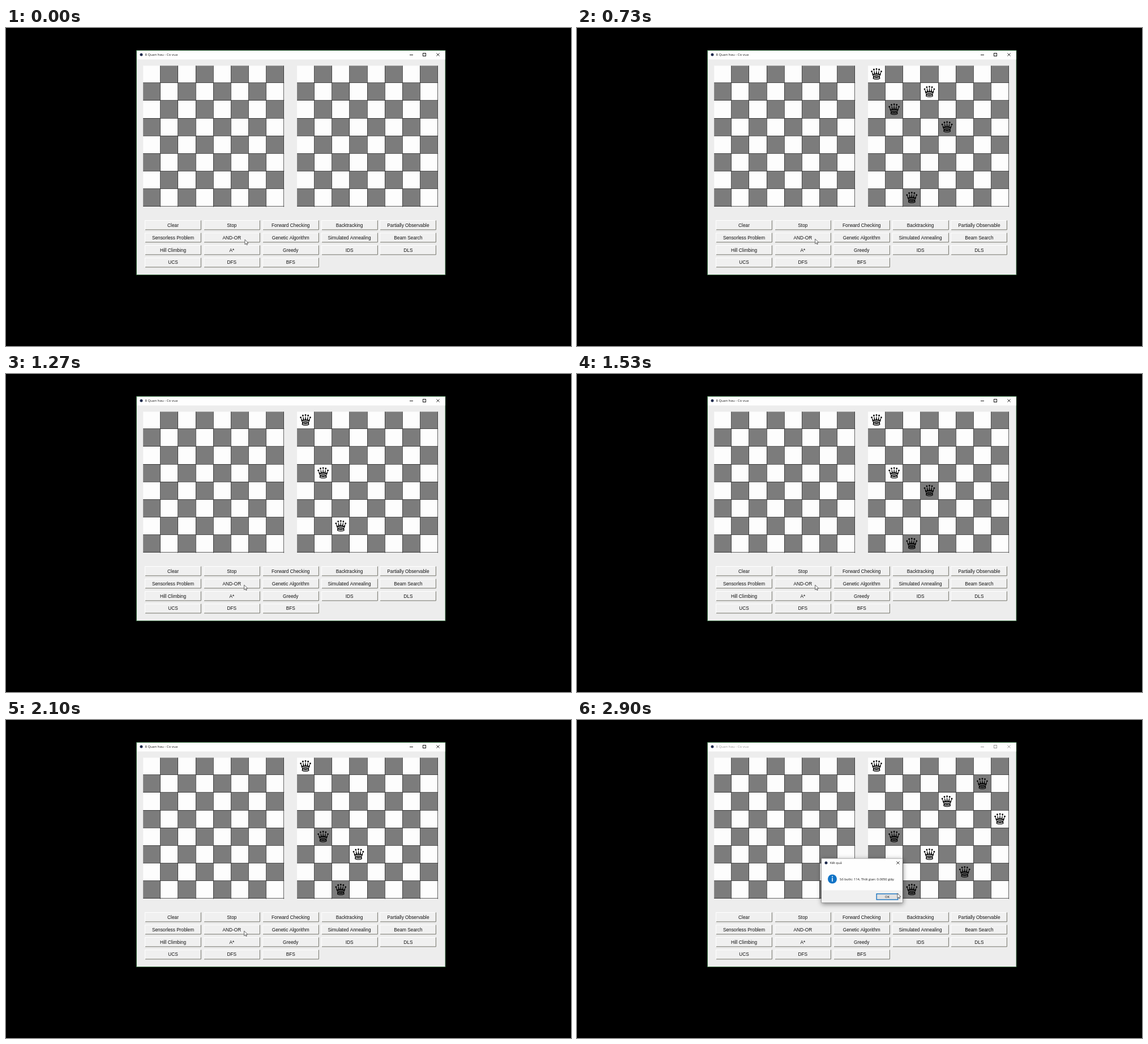
Animation of 998 by 561 pixels, one loop 2930 ms. Source, as an HTML page with a canvas:

```html
<!DOCTYPE html>
<html lang="vi">
<head>
<meta charset="utf-8">
<title>8 Quan hau</title>
<style>
  html, body { margin: 0; width: 100%; height: 100%; overflow: hidden; background: #000; }
  canvas { display: block; }
</style>
</head>
<body>
<canvas id="stage" width="998" height="561"></canvas>
<script>
const stage = document.getElementById('stage');
const screen2d = stage.getContext('2d');
let ctx = screen2d;

const LOOP = 2930, FRAME = 100 / 3;
const STEP = 17.78, LEAD = 8.19;
const CELL = 31.15, LEFT_X = 241.6, RIGHT_X = 513.45, BOARD_Y = 65.6;
const UI = '"Open Sans", "Noto Sans", sans-serif';
const WHITE = '#fdfdfd', GRAY = '#7c7c7c', FACE = '#ededed';
const DIALOG_AT = 2200;

const LABELS = [
  ['Clear', 'Stop', 'Forward Checking', 'Backtracking', 'Partially Observable'],
  ['Sensorless Problem', 'AND-OR', 'Genetic Algorithm', 'Simulated Annealing', 'Beam Search'],
  ['Hill Climbing', 'A*', 'Greedy', 'IDS', 'DLS'],
  ['UCS', 'DFS', 'BFS']
];

const clamp = v => Math.max(0, Math.min(1, v));
const easeOut = (p, n) => 1 - Math.pow(1 - clamp(p), n);

// Every state visited by the depth-first search, column by column
function searchSteps(size) {
  const steps = [[]];
  const safe = (rows, row) => rows.every((r, c) =>
    r !== row && Math.abs(r - row) !== rows.length - c);
  const visit = rows => {
    if (rows.length === size) return true;
    for (let row = 0; row < size; row++) {
      if (!safe(rows, row)) continue;
      const next = [...rows, row];
      steps.push(next);
      if (visit(next)) return true;
    }
    return false;
  };
  visit([]);
  return steps;
}
const steps = searchSteps(8);

function rect(x, y, w, h, color) {
  ctx.fillStyle = color;
  ctx.fillRect(x, y, w, h);
}

function line(color, width, ...pts) {
  ctx.strokeStyle = color;
  ctx.lineWidth = width;
  ctx.beginPath();
  for (let i = 0; i < pts.length; i += 2) ctx.lineTo(pts[i], pts[i + 1]);
  ctx.stroke();
}

function disc(x, y, r, color) {
  ctx.fillStyle = color;
  ctx.beginPath();
  ctx.arc(x, y, r, 0, Math.PI * 2);
  ctx.fill();
}

function text(str, x, y, font, color, align = 'left') {
  ctx.font = font;
  ctx.fillStyle = color;
  ctx.textAlign = align;
  ctx.fillText(str, x, y);
}

function cross(x, y, r, color) {
  line(color, 0.9, x - r, y - r, x + r, y + r);
  line(color, 0.9, x + r, y - r, x - r, y + r);
}

function drawWindow(active) {
  const ink = active ? '#1a1a1a' : '#999';
  rect(230, 39, 546.4, 397, '#3a7445');
  rect(231, 40, 544.6, 395, FACE);
  rect(231, 40, 544.6, 15.5, '#fefefe');
  disc(239, 47, 2.5, '#1d2a4d');
  text('8 Quan hau - Co vua', 245.5, 49.3, '6.1px ' + UI, ink);
  line(ink, 1, 713, 47.5, 719, 47.5);
  ctx.strokeRect(736.5, 44.5, 5, 5);
  cross(763, 47, 2.6, ink);
}

function drawBoard(x0) {
  const end = 8 * CELL, ink = 'rgba(20,20,20,.72)';
  ctx.save();
  ctx.beginPath();
  ctx.rect(x0 + 0.6, BOARD_Y + 0.9, end, end);
  ctx.clip();
  for (let r = 0; r < 8; r++) {
    for (let c = 0; c < 8; c++) {
      rect(x0 + c * CELL, BOARD_Y + r * CELL, CELL + 0.1, CELL + 0.1, (r + c) % 2 ? GRAY : WHITE);
    }
  }
  for (let i = 1; i <= 8; i++) {
    const x = Math.floor(x0 + i * CELL) + 0.5;
    const y = Math.floor(BOARD_Y + i * CELL) + 0.5;
    line(ink, 0.9, x, BOARD_Y, x, BOARD_Y + end + 1);
    line(ink, 0.9, x0, y, x0 + end + 1, y);
  }
  ctx.restore();
}

function drawQueen(col, row) {
  const back = (col + row) % 2 ? GRAY : WHITE;
  ctx.save();
  ctx.translate(RIGHT_X + (col + 0.5) * CELL, BOARD_Y + (row + 0.5) * CELL - 0.2);
  const tips = [[-8.4, -4.3], [-4.6, -7.8], [0, -8.6], [4.6, -7.8], [8.4, -4.3]];
  tips.forEach(([x, y], i) => {
    disc(x, y, 1.4, '#000');
    const base = (i - 2) * 2.9;
    ctx.beginPath();
    ctx.moveTo(x, y);
    ctx.lineTo(base - 1.4, 2);
    ctx.lineTo(base + 1.4, 2);
    ctx.fill();
  });
  ctx.beginPath();
  ctx.moveTo(-7.3, 1);
  ctx.quadraticCurveTo(0, -2.2, 7.3, 1);
  ctx.lineTo(5.9, 4.8);
  ctx.lineTo(6.4, 8.4);
  ctx.quadraticCurveTo(0, 11.4, -6.4, 8.4);
  ctx.lineTo(-5.9, 4.8);
  ctx.fill();
  ctx.strokeStyle = back;
  ctx.lineWidth = 1.2;
  for (const [w, y, bend] of [[5.6, 3.3, -2.6], [4.8, 7.2, 1.8]]) {
    ctx.beginPath();
    ctx.moveTo(-w, y);
    ctx.quadraticCurveTo(0, y + bend, w, y);
    ctx.stroke();
  }
  line(back, 1.1, -4, 5.4, -1.4, 5);
  line(back, 1.1, 1.4, 5, 4, 5.4);
  disc(0, 4.8, 0.9, back);
  ctx.restore();
}

function drawButtons() {
  LABELS.forEach((row, r) => row.forEach((label, c) => {
    const x = Math.round(246 + c * 103.85), y = Math.round(339.4 + r * 21.75);
    rect(x - 0.5, y, 99, 17, '#f0f0f0');
    line('#fff', 1, x - 0.5, y + 17, x - 0.5, y + 0.5, x + 98, y + 0.5);
    line('#73736a', 1, x, y + 16.9, x + 98.4, y + 16.9, x + 98.4, y + 0.5);
    text(label, 295 + c * 103.85, 351.2 + r * 21.75,
      '8.3px "Liberation Sans", Arial, sans-serif', '#111', 'center');
  }));
}

function paintDialog() {
  ctx.save();
  ctx.shadowColor = 'rgba(0,0,0,.45)';
  ctx.shadowBlur = 8;
  ctx.shadowOffsetY = 2;
  rect(431.5, 244, 144, 78.5, '#777');
  ctx.restore();
  rect(432, 244.5, 143, 77.5, '#fefefe');
  rect(432, 300.5, 143, 21.5, '#f0f0f0');
  disc(440, 252, 2.5, '#1d2a4d');
  text('Kết quả', 447, 254.2, '5.8px ' + UI, '#111');
  cross(567, 252, 2.6, '#222');
  disc(451, 280.5, 8, '#1173c6');
  rect(450.3, 278.4, 1.5, 6.6, '#fff');
  disc(451.05, 276.2, 1, '#fff');
  text('Số bước: 114, Thời gian: 0.0050 giây', 464, 282.8, '5.8px ' + UI, '#111');
  rect(528.5, 306, 39, 11.5, '#0a6cbd');
  rect(529.8, 307.3, 36.4, 8.9, '#e1e1e1');
  text('OK', 548, 314, '5.8px ' + UI, '#111', 'center');
}

// The dialog is painted once on its own layer so that it can fade as a whole
const layer = document.createElement('canvas');
layer.width = stage.width;
layer.height = stage.height;
ctx = layer.getContext('2d');
paintDialog();
ctx = screen2d;

function drawDialog(t) {
  const age = t - DIALOG_AT;
  if (age <= 0) return;
  const scale = 0.9 + 0.1 * easeOut(age / 160, 3);
  ctx.save();
  ctx.globalAlpha = clamp(age / 95);
  ctx.translate(503.5, 283);
  ctx.scale(scale, scale);
  ctx.drawImage(layer, -503.5, -283);
  ctx.restore();
}

function drawCursor(t) {
  const settle = clamp(t / 130), go = easeOut((t - 2350) / 550, 2);
  const x = 422 - 1.3 * settle + 145.3 * go;
  const y = 373.3 - 1.2 * settle - 66.3 * go;
  ctx.save();
  ctx.translate(x, y);
  ctx.beginPath();
  for (const [px, py] of [[0, 0], [0, 8.6], [2, 6.8], [3.3, 9.6], [4.6, 9], [3.4, 6.3], [6, 6.1]]) {
    ctx.lineTo(px, py);
  }
  ctx.closePath();
  ctx.fillStyle = '#fff';
  ctx.fill();
  ctx.strokeStyle = '#333';
  ctx.lineWidth = 0.75;
  ctx.stroke();
  ctx.restore();
}

function draw(now) {
  // The picture is held for one thirtieth of a second at a time
  const t = Math.floor((now % LOOP + 4) / FRAME) * FRAME;
  const index = Math.floor(t / STEP - LEAD);
  const rows = steps[Math.max(0, Math.min(steps.length - 1, index))];
  rect(0, 0, 998, 561, '#000');
  drawWindow(t < DIALOG_AT);
  drawBoard(LEFT_X);
  drawBoard(RIGHT_X);
  rows.forEach((row, col) => drawQueen(col, row));
  drawButtons();
  drawDialog(t);
  drawCursor(t);
}

const start = performance.now();
function tick() {
  draw(performance.now() - start);
  requestAnimationFrame(tick);
}
tick();
</script>
</body>
</html>
```
